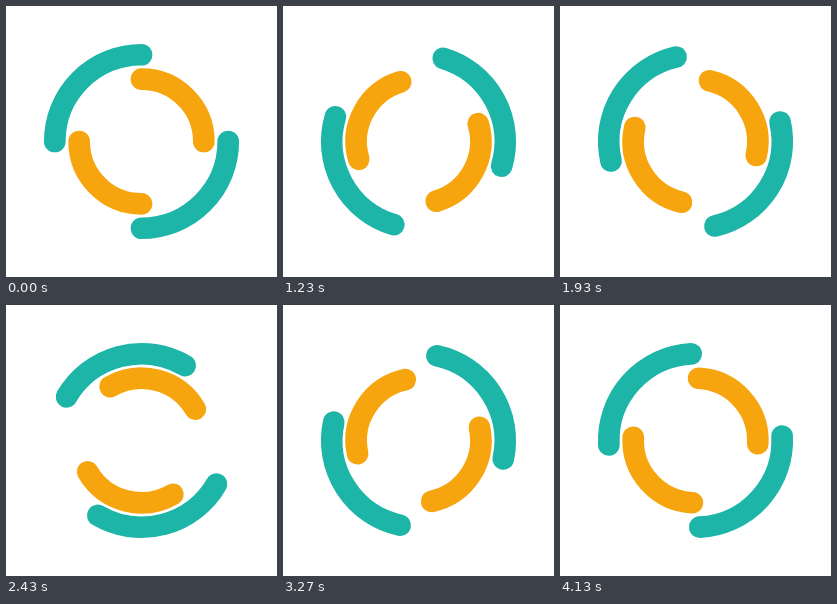
These frames come from a looping animation (271 px wide and 271 px high, 4.17 s). An HTML page:

```html
<!DOCTYPE html>
<html lang="en">
<head>
<meta charset="utf-8">
<title>Double ring spinner</title>
<style>
  html, body { margin: 0; width: 100%; height: 100%; overflow: hidden; background: #fff; }
  svg { display: block; width: 100vw; height: 100vh; }
  path { fill: none; stroke-width: 8; stroke-linecap: round; }
</style>
</head>
<body>
<svg viewBox="-50 -50 100 100">
  <path id="outer" stroke="#1cb5a8" d="M32 0A32 32 0 0 1 0 32M-32 0A32 32 0 0 1 0 -32"/>
  <path id="inner" stroke="#f7a50e" d="M0 -23A23 23 0 0 1 23 0M0 23A23 23 0 0 1 -23 0"/>
</svg>
<script>
  const LOOP = 4170;
  const STEPS = 125;
  const STEP_MS = 100 / 3;
  const ROUNDING = 3.4; // steps begin on whole 10 ms ticks, up to 3.3 ms early
  const outer = document.getElementById('outer');
  const inner = document.getElementById('inner');

  function render(time) {
    const step = Math.min(STEPS - 1, Math.floor((time % LOOP + ROUNDING) / STEP_MS));
    const angle = step * 360 / STEPS;
    outer.setAttribute('transform', `rotate(${angle})`);
    inner.setAttribute('transform', `rotate(${-angle})`);
  }

  function tick() {
    render(performance.now());
    requestAnimationFrame(tick);
  }

  render(0);
  requestAnimationFrame(tick);
</script>
</body>
</html>
```
